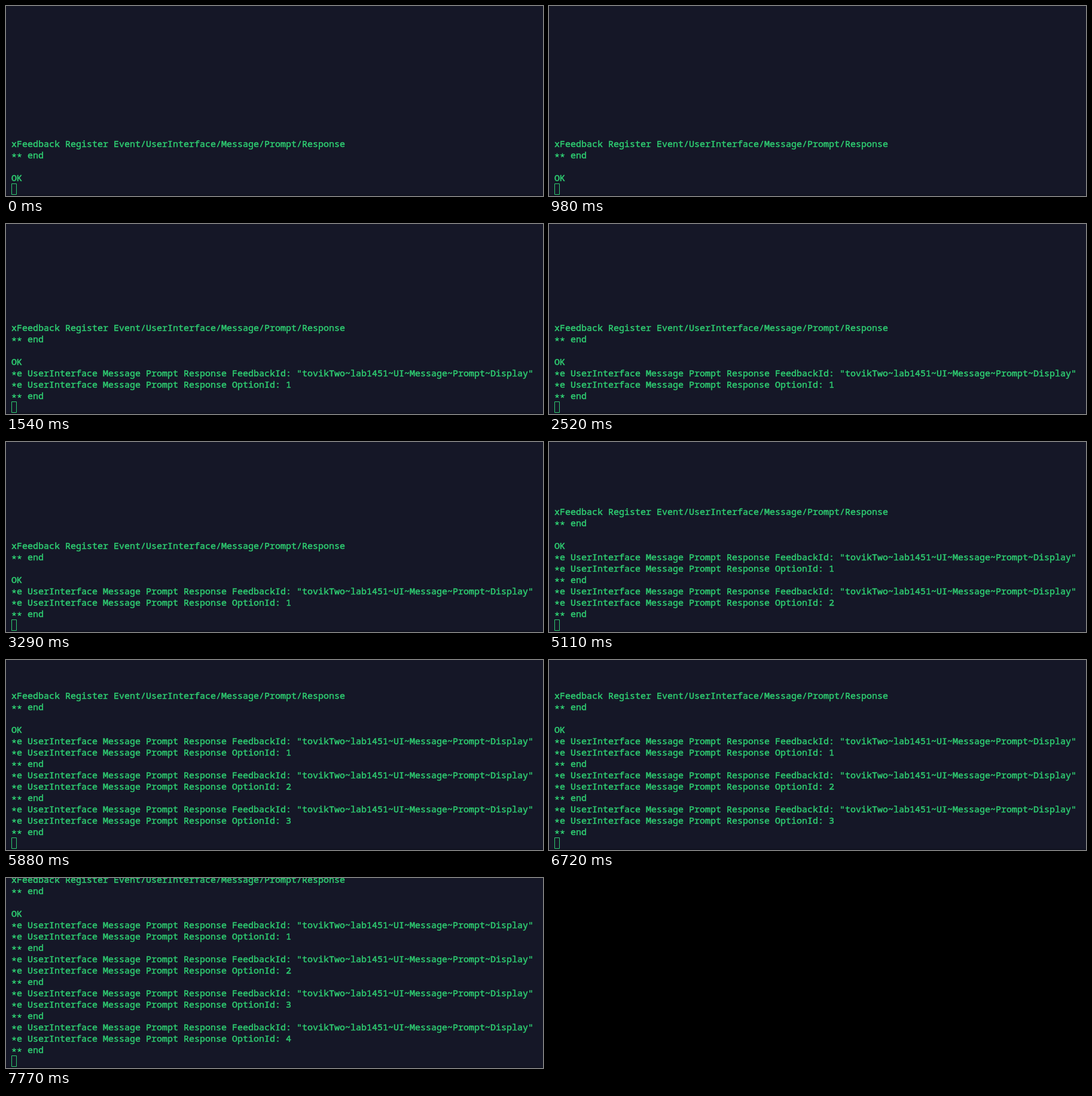
These frames come from a looping animation (898x318 px, 8000 ms). An HTML page with a canvas:

```html
<!DOCTYPE html>
<html lang="en">
<head>
<meta charset="utf-8">
<title>Terminal feedback</title>
<style>
  html, body { margin: 0; width: 100%; height: 100%; overflow: hidden; background: #151727; }
  canvas { display: block; width: 898px; height: 318px; }
</style>
</head>
<body>
<canvas id="stage" width="898" height="318"></canvas>
<script>
const ctx = document.getElementById('stage').getContext('2d');

const LOOP = 8000;
const ARRIVALS = [1540, 3850, 5880, 7770]; // when each response is printed
const CELL = 9, ROW = 19, LEFT = 9, LAST_BASELINE = 293;
const BACK = '#151727', EDGE = '#10121f', GREEN = '#2ecc71';

const HEADER = [
  'xFeedback Register Event/UserInterface/Message/Prompt/Response',
  '** end',
  '',
  'OK'
];

function response(id) {
  const head = '*e UserInterface Message Prompt Response ';
  return [
    head + 'FeedbackId: "tovikTwo~lab1451~UI~Message~Prompt~Display"',
    head + 'OptionId: ' + id,
    '** end'
  ];
}

// a thin outline gives the glyphs a medium weight
function drawGlyph(c, x, y) {
  ctx.fillText(c, x, y);
  ctx.strokeText(c, x, y);
}

function drawStar(x, y) {
  ctx.beginPath();
  for (let k = 0; k < 5; k++) {
    const a = -Math.PI / 2 + k * Math.PI * 2 / 5;
    ctx.moveTo(x, y);
    ctx.lineTo(x + 3.6 * Math.cos(a), y + 3.6 * Math.sin(a));
  }
  ctx.lineWidth = 1.4;
  ctx.stroke();
}

function drawLine(text, baseline) {
  [...text].forEach((c, i) => {
    const x = LEFT + i * CELL;
    if (c === '*') {
      drawStar(x + CELL / 2, baseline - 5);
    } else {
      ctx.lineWidth = 0.5;
      drawGlyph(c, x, baseline);
    }
  });
}

function draw(t) {
  const lines = [...HEADER];
  ARRIVALS.forEach((at, i) => {
    if (t >= at) lines.push(...response(i + 1));
  });

  ctx.fillStyle = BACK;
  ctx.fillRect(0, 0, 898, 318);
  ctx.fillStyle = EDGE;
  ctx.fillRect(0, 316, 898, 2);
  ctx.beginPath();
  ctx.moveTo(0, 0);
  ctx.lineTo(4, 0);
  ctx.quadraticCurveTo(0, 0, 0, 4);
  ctx.fill();

  ctx.font = '500 15px "Noto Sans Mono", "DejaVu Sans Mono", monospace';
  ctx.textBaseline = 'alphabetic';
  ctx.lineJoin = 'round';
  ctx.fillStyle = ctx.strokeStyle = GREEN;
  lines.forEach((line, i) => {
    drawLine(line, LAST_BASELINE - (lines.length - 1 - i) * ROW);
  });

  ctx.lineWidth = 1;
  ctx.strokeRect(LEFT + 0.5, 297.5, 8, 18);
}

const start = performance.now();
function tick() {
  draw((performance.now() - start) % LOOP);
  requestAnimationFrame(tick);
}
tick();
</script>
</body>
</html>
```
